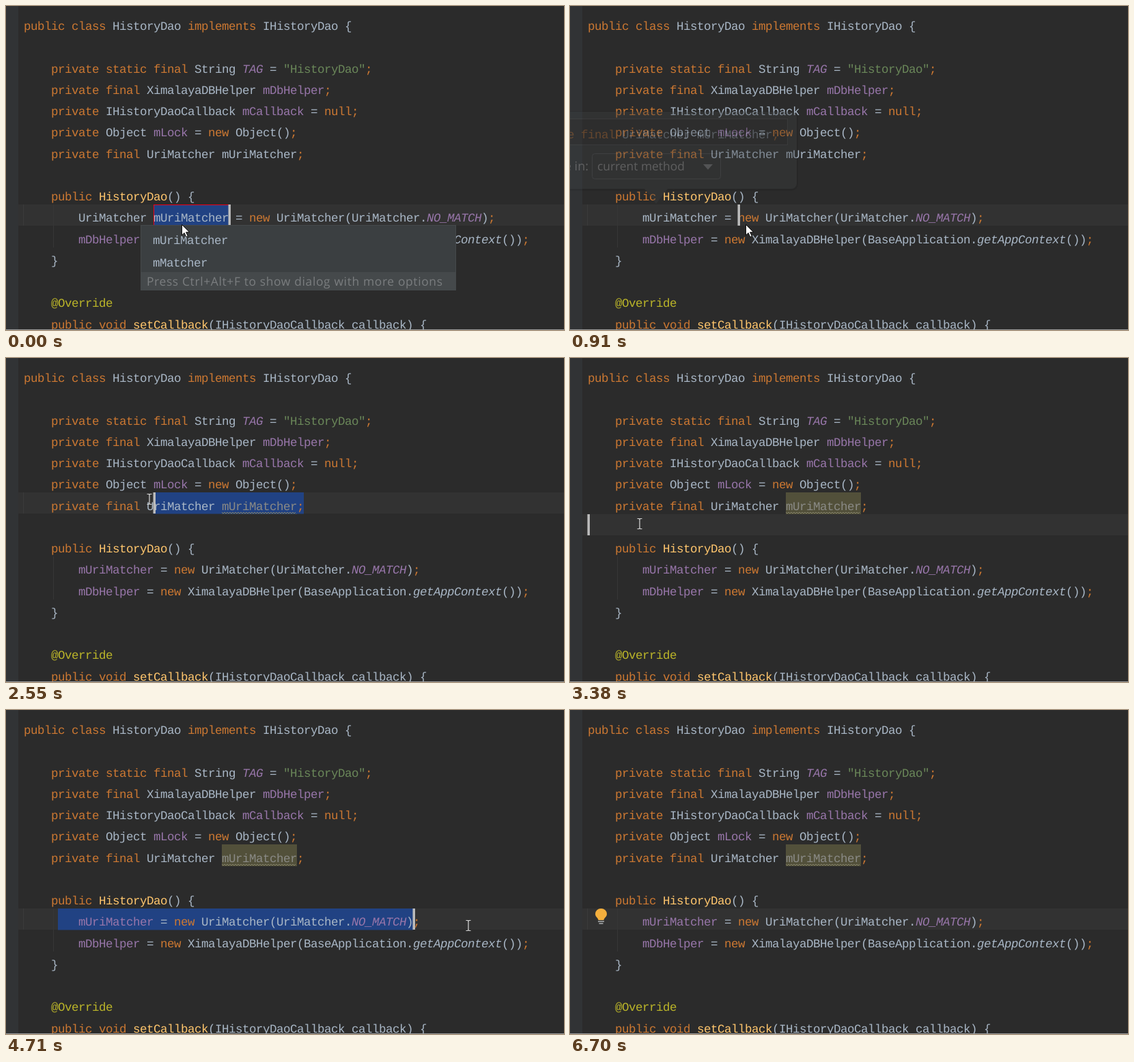
These frames come from a looping animation (817 by 475 pixels, 6.8 s). An HTML page:

```html
<!DOCTYPE html>
<html lang="en">
<head>
<meta charset="utf-8">
<title>Extract field</title>
<style>
html, body { margin: 0; width: 100%; height: 100%; overflow: hidden; background: #2b2b2b; }
svg { display: block; width: 817px; height: 475px; }
text { white-space: pre; fill: #a9b7c6; text-rendering: geometricPrecision; }
.code { font: 17.5px "Liberation Mono", monospace; letter-spacing: calc(10px - 1ch); }
.ui { font: 17.4px "Open Sans", "Noto Sans", sans-serif; fill: #bbb; }
.label { font-size: 18px; text-anchor: end; }
.keyword { fill: #cc7832; }
.string { fill: #6a8759; }
.field { fill: #9876aa; }
.constant { fill: #9876aa; font-style: italic; }
.call { font-style: italic; }
.method { fill: #ffc66d; }
.annotation { fill: #bbb529; }
.hint { fill: #7a7d7f; letter-spacing: .65px; }
.analyzed #declaration .extracted { fill: #8a8a86; }
.analyzed #assignment .extracted { fill: #9876aa; }
#unused, #wave { visibility: hidden; }
.analyzed #unused, .analyzed #wave { visibility: visible; }
</style>
</head>
<body>
<svg id="stage" viewBox="0 0 817 475">
  <rect width="817" height="475" fill="#2b2b2b"/>
  <rect width="18" height="475" fill="#313335"/>
  <g id="band">
    <rect x="18" width="799" height="31" fill="#323232"/>
    <path d="M25.5 0v31" stroke="#3b3b3b"/>
  </g>
  <path d="M69.5 291v63" stroke="#373737"/>
  <rect id="unused" x="316" y="197" width="110" height="32" fill="#52503a"/>
  <rect id="selection" height="31.5" fill="#214283"/>
  <rect id="template" x="216.5" y="291.5" width="110" height="30" fill="#214283" stroke="#f00018"/>
  <g id="code"></g>
  <path id="wave" fill="none" stroke="#85836a"/>
  <rect id="caret" width="3.5" height="31" fill="#bbb"/>

  <g id="bulb">
    <path d="M41.5 308c0-3-4.500-4.500-4.500-9a8.500 8 0 0 1 17 0c0 4.500-4.500 6-4.500 9z" fill="#f4af3d"/>
    <path d="M41 310h9M42.500 313h6" stroke="#afb1b3" stroke-width="1.500"/>
  </g>

  <g id="popup">
    <rect x="197.500" y="321.500" width="461" height="95" fill="#3b3f41" stroke="#45484a"/>
    <rect x="197" y="390" width="462" height="27" fill="#45494b"/>
    <text class="code" x="215" y="349">mUriMatcher</text>
    <text class="code" x="215" y="382">mMatcher</text>
    <text class="ui hint" x="206" y="410">Press Ctrl+Alt+F to show dialog with more options</text>
  </g>

  <g id="tip">
    <rect x="5" y="154" width="419" height="117" rx="10" fill="#000" opacity=".2"/>
    <path d="M14 155H414a8 8 0 0 1 8 8V260a8 8 0 0 1-8 8H233L216 290 199 268H14a8 8 0 0 1-8-8V163a8 8 0 0 1 8-8z" fill="#3c3f41"/>
    <rect x="21.500" y="165.500" width="387" height="38" fill="#323232" stroke="#777" stroke-dasharray="1 1"/>
    <g id="preview"></g>
    <text class="ui label" x="117" y="241">Initialize in:</text>
    <rect x="122.500" y="216.500" width="188" height="37" rx="4" fill="#3c3f41" stroke="#646669"/>
    <text class="ui" x="130" y="241">current method</text>
    <path d="M285 232h14l-7 8z" fill="#9a9da0"/>
  </g>

  <path id="arrow" d="M.5.500v15.500l3.600-3.400 2.700 6 2.500-1.200-2.700-5.700h5z" fill="#fff" stroke="#000" stroke-width=".9"/>
  <path id="beam" d="M-3.500-7.500h2.500l1 1 1-1h2.500M0-6.500v13M-3.500 7.500h2.500l1-1 1 1h2.500" fill="none" stroke="#d8d8d8" stroke-width="1.200"/>
  <rect y="474" width="817" height="1" fill="#9a9a9a"/>
</svg>
<script>
const DURATION = 6800, CELL = 10, LEFT = 26, PITCH = 31.25;
const $ = id => document.getElementById(id);
const rowTop = row => Math.round(9.9 + row * PITCH);
const baseline = row => Math.round(35.1 + row * PITCH);
const colX = col => LEFT + col * CELL;

const RULES = [
  ['string', /"[^"]*"/],
  ['annotation', /@\w+/],
  ['method', /(?<=public )HistoryDao|setCallback/],
  ['keyword', /\b(?:public|private|class|implements|static|final|new|null|void)\b|;/],
  ['constant', /TAG|NO_MATCH/],
  ['call', /getAppContext/],
  ['field', /mDbHelper|mCallback|mLock/],
  ['extracted', /mUriMatcher/]
];
const TOKEN = new RegExp(RULES.map(([name, rule]) => `(?<${name}>${rule.source})`).join('|'), 'g');

function codeLine(source, x, y, id = '') {
  const body = source.replace(TOKEN, (token, ...rest) => {
    const groups = rest.at(-1);
    const name = Object.keys(groups).find(key => groups[key]);
    return `<tspan class="${name}">${token}</tspan>`;
  });
  return `<text class="code" id="${id}" x="${x}" y="${y}">${body}</text>`;
}

const LINES = [
  [0, 0, 'public class HistoryDao implements IHistoryDao {'],
  [2, 4, 'private static final String TAG = "HistoryDao";'],
  [3, 4, 'private final XimalayaDBHelper mDbHelper;'],
  [4, 4, 'private IHistoryDaoCallback mCallback = null;'],
  [5, 4, 'private Object mLock = new Object();'],
  [6, 4, 'private final UriMatcher mUriMatcher;', 'declaration'],
  [8, 4, 'public HistoryDao() {'],
  [9, 8, 'UriMatcher mUriMatcher = new UriMatcher(UriMatcher.NO_MATCH);', 'local'],
  [9, 8, 'mUriMatcher = new UriMatcher(UriMatcher.NO_MATCH);', 'assignment'],
  [10, 8, 'mDbHelper = new XimalayaDBHelper(BaseApplication.getAppContext());'],
  [11, 4, '}'],
  [13, 4, '@Override'],
  [14, 4, 'public void setCallback(IHistoryDaoCallback callback) {']
];
$('code').innerHTML = LINES.map(([row, col, source, id]) =>
  codeLine(source, colX(col), baseline(row), id || `line${row}`)).join('');
$('preview').innerHTML = codeLine('private final UriMatcher mUriMatcher;', 26, 194, 'field-preview');
$('wave').setAttribute('d', 'M316 226' + 'l2 2 2-2'.repeat(27));

// Each entry overrides the state before it; anchor and caret are columns.
const TIMELINE = [
  [0, { naming: true, analyzed: false, tip: 0, tipX: 0, row: 9, caret: 30, anchor: null, bulb: false, arrow: [257, 320], beam: null }],
  [120, { tip: .5 }],
  [240, { tip: 1 }],
  [790, { naming: false, tip: .7, tipX: -90, caret: 22 }],
  [910, { tip: .36 }],
  [1060, { tip: 0 }],
  [1180, { analyzed: true }],
  [1610, { bulb: true }],
  [1860, { arrow: null, beam: [282.5, 293] }],
  [2010, { beam: [430, 240] }],
  [2130, { beam: [584, 216] }],
  [2250, { beam: [491, 213], row: 6, caret: 41, bulb: false }],
  [2400, { beam: [365, 210], anchor: 41, caret: 33 }],
  [2550, { beam: [210, 207], caret: 19 }],
  [2710, { beam: [117.5, 208], caret: 10 }],
  [2860, { beam: [90, 210], caret: 7 }],
  [2980, { beam: [74, 212], caret: 5 }],
  [3110, { beam: [74, 215] }],
  [3260, { beam: [90, 236], row: 7, caret: 0, anchor: null }],
  [3380, { beam: [102, 243] }],
  [3500, { beam: [106, 276] }],
  [3620, { beam: [111, 310] }],
  [3770, { beam: [73, 318] }],
  [4020, { beam: [139, 313], row: 9, anchor: 5, caret: 11 }],
  [4170, { beam: [434, 312], caret: 41 }],
  [4320, { beam: [560, 313], caret: 54 }],
  [4440, { beam: [600, 315], caret: 57 }],
  [4590, { beam: [655, 316] }],
  [4710, { beam: [677, 316] }],
  [4980, { anchor: null, caret: 58 }],
  [5480, { beam: [697, 330] }],
  [5610, { beam: null }],
  [5750, { bulb: true, beam: [516.5, 367] }],
  [5880, { caret: null }],
  [6030, { beam: null }],
  [6300, { caret: 58 }],
  [6700, { caret: null }]
];

const stateAt = time => Object.assign({}, ...TIMELINE.filter(([at]) => at <= time).map(([, change]) => change));
const show = (id, on) => $(id).setAttribute('visibility', on ? 'visible' : 'hidden');
const move = (id, x, y) => $(id).setAttribute('transform', `translate(${x} ${y})`);

function pointer(id, place) {
  show(id, place);
  if (place) move(id, ...place);
}

function render(time) {
  const s = stateAt(time), top = rowTop(s.row);
  $('stage').classList.toggle('analyzed', s.analyzed);
  for (const id of ['template', 'popup', 'local']) show(id, s.naming);
  show('assignment', !s.naming);
  show('bulb', s.bulb);
  move('band', 0, top);

  show('caret', s.caret !== null);
  move('caret', colX(s.caret) - .5, top);
  show('selection', s.anchor !== null);
  if (s.anchor !== null) {
    move('selection', colX(Math.min(s.anchor, s.caret)), top);
    $('selection').setAttribute('width', Math.abs(s.anchor - s.caret) * CELL);
  }

  $('tip').setAttribute('opacity', s.tip);
  move('tip', s.tipX, 0);
  pointer('arrow', s.arrow);
  pointer('beam', s.beam);
}

const start = performance.now();
function tick() {
  render((performance.now() - start) % DURATION);
  requestAnimationFrame(tick);
}
tick();
</script>
</body>
</html>
```
